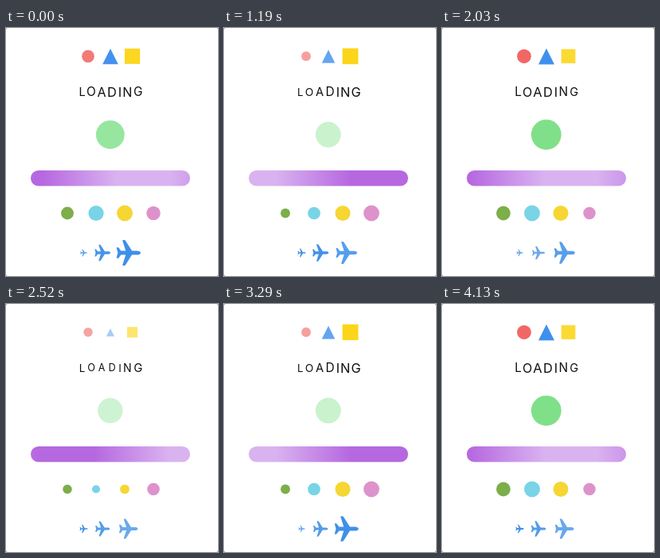
Write an HTML page that moves like this. It is 266 px wide and 310 px high and loops after 4200 ms.

```html
<!DOCTYPE html>
<html lang="en">
<head>
<meta charset="utf-8">
<title>Loading indicators</title>
<style>
  html, body { margin: 0; width: 100%; height: 100%; overflow: hidden; background: #888; }
  svg { display: block; width: 266px; height: 310px; background: #fff; border-radius: 2px; }
  text { font: 400 16.5px Inter, "Liberation Sans", sans-serif; text-anchor: middle; fill: #111; }
</style>
</head>
<body>
<svg id="stage" viewBox="0 0 266 310">
  <defs>
    <linearGradient id="sweep" gradientUnits="userSpaceOnUse" x1="-163" y1="0" x2="162.5" y2="0" spreadMethod="repeat">
      <stop offset="0" stop-color="#d9b3f0"/>
      <stop offset=".1" stop-color="#d9b3f0"/>
      <stop offset=".39" stop-color="#b668e0"/>
      <stop offset=".61" stop-color="#b668e0"/>
      <stop offset=".9" stop-color="#d9b3f0"/>
      <stop offset="1" stop-color="#d9b3f0"/>
    </linearGradient>
  </defs>
  <rect x="31" y="178" width="200" height="19.6" rx="9.8" fill="url(#sweep)"/>
</svg>
<script>
const LOOP = 4200, STEP = 70;
const PULSE = 1050, FLIGHT = 1575, SWEEP = 2100;
const NS = "http://www.w3.org/2000/svg";
const stage = document.getElementById("stage");
const sweep = document.getElementById("sweep");
const parts = [];

// Each part swells from minScale to 1 and fades from minAlpha to 1, peaking at `peak` ms.
function add(tag, attrs, x, y, motion) {
  const el = document.createElementNS(NS, tag);
  for (const key in attrs) el.setAttribute(key, attrs[key]);
  stage.append(el);
  parts.push({ el, x, y, size: 1, period: PULSE, minScale: 0.5, minAlpha: 1, ...motion });
  return el;
}

// Top row of shapes
add("circle", { r: 10, fill: "#ef5350" }, 103, 35.3, { peak: 815, minAlpha: 0.45 });
add("path", { d: "M0-10L10 10H-10Z", fill: "#3f90ee" }, 131, 35.5, { peak: 980, minAlpha: 0.45 });
add("rect", { x: -10, y: -10, width: 20, height: 20, fill: "#fcd518" }, 158.5, 35.3, { peak: 1145, minAlpha: 0.45 });

// Letters
const centers = [95.6, 107, 120, 133, 143, 152.3, 165.7];
[..."LOADING"].forEach((letter, i) => {
  add("text", { y: 6 }, centers[i], 79.8, { peak: 790 + 75 * i, minScale: 0.76 }).textContent = letter;
});

// Large pulsing disc
add("circle", { r: 20, fill: "#64da70" }, 130.8, 133.3, { peak: 815, minScale: 0.75, minAlpha: 0.2 });

// Row of dots
["#7cae4a", "#78d4e6", "#f6d632", "#de92cc"].forEach((fill, i) => {
  add("circle", { r: 10, fill }, 77 + 36 * i, 231.5, { peak: 815 + 137 * i });
});

// Planes
const half = s => `C15.5 ${1.6 * s} 13 ${2.6 * s} 11 ${2.6 * s}H4.5L-3.6 ${15.2 * s}Q-4.2 ${16 * s} -5 ${16 * s}`
  + `H-6.6Q-7.6 ${16 * s} -7.2 ${14.8 * s}L-3.3 ${2.6 * s}H-9.2L-12.2 ${6.4 * s}Q-12.5 ${6.8 * s} -13.1 ${6.8 * s}`
  + `H-14.2Q-15 ${6.8 * s} -14.8 ${6 * s}L-13.2 0Z`;
const plane = `M15.5 0${half(1)}M15.5 0${half(-1)}`;
[[97.5, 0.34], [121, 0.68], [153.5, 1]].forEach(([x, size], i) => {
  add("path", { d: plane, fill: "#3e8fe8" }, x, 281,
    { size, peak: 1080 + 260 * i, period: FLIGHT, minScale: 0.76, minAlpha: 0.75 });
});

const mix = (low, k) => low + (1 - low) * k;

function draw(time) {
  for (const p of parts) {
    const k = (1 + Math.cos(2 * Math.PI * (time - p.peak) / p.period)) / 2;
    const scale = p.size * mix(p.minScale, k);
    p.el.setAttribute("transform", `translate(${p.x} ${p.y}) scale(${scale})`);
    p.el.setAttribute("opacity", mix(p.minAlpha, k));
  }
  const shift = 10 + 325.5 * (time % SWEEP) / SWEEP;
  sweep.setAttribute("gradientTransform", `translate(${shift} 0)`);
}

const start = performance.now();
function tick() {
  const time = (performance.now() - start) % LOOP;
  draw(Math.floor(time / STEP) * STEP);
  requestAnimationFrame(tick);
}
tick();
</script>
</body>
</html>
```
